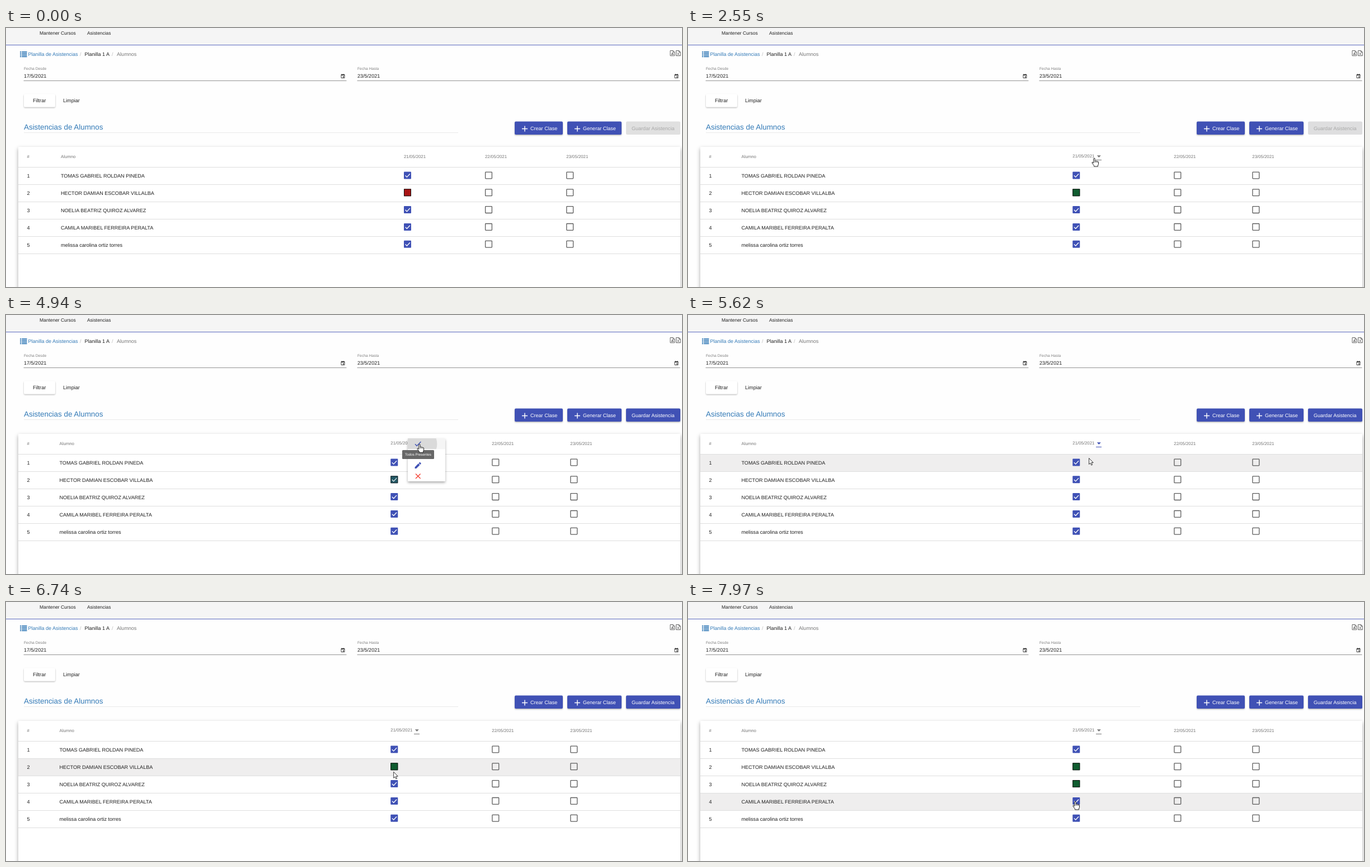
An HTML page for the animation above (8 s loop, 1208 by 464 pixels).

```html
<!DOCTYPE html>
<html lang="es">
<head>
<meta charset="utf-8">
<title>Planilla de Asistencias</title>
<style>
html, body { margin: 0; width: 1208px; height: 464px; overflow: hidden; background: #fefefe; }
svg { display: block; font-family: "Liberation Sans", Arial, sans-serif; text-rendering: geometricPrecision; }
</style>
</head>
<body>
<svg id="stage" width="1208" height="464" viewBox="0 0 1208 464"></svg>
<script>
const LOOP = 8000;
const BLUE = '#3f51b5', LINK = '#337ab7', INK = '#212121', GREY = '#757575';
const RED = [169, 20, 20], GREEN = [15, 92, 47], INDIGO = [63, 81, 181];
const names = [
  'TOMAS GABRIEL ROLDAN PINEDA',
  'HECTOR DAMIAN ESCOBAR VILLALBA',
  'NOELIA BEATRIZ QUIROZ ALVAREZ',
  'CAMILA MARIBEL FERREIRA PERALTA',
  'melissa carolina ortiz torres'
];
const dates = ['21/05/2021', '22/05/2021', '23/05/2021'];
const rowTop = i => 250 + 31 * i;
const boxMid = i => 264 + 30.8 * i;

// --- markup helpers
const text = (x, y, s, size = 9.05, fill = INK, extra = '') =>
  `<text x="${x}" y="${y}" font-size="${size}" fill="${fill}" ${extra}>${s}</text>`;
const rect = (x, y, w, h, fill, extra = '') =>
  `<rect x="${x}" y="${y}" width="${w}" height="${h}" fill="${fill}" ${extra}/>`;
const line = (d, color, w = 1, extra = '') =>
  `<path d="${d}" fill="none" stroke="${color}" stroke-width="${w}" ${extra}/>`;
const group = (id, body, extra = '') => `<g id="${id}" ${extra}>${body}</g>`;
const shadow = (id, dy, blur, alpha) =>
  `<filter id="${id}" x="-20%" y="-40%" width="140%" height="190%">
   <feDropShadow dx="0" dy="${dy}" stdDeviation="${blur}" flood-opacity="${alpha}"/></filter>`;

const field = (x, label, value) =>
  text(x, 75, label, 6.75, '#808080') + text(x, 89, value) +
  rect(x - .5, 94, 577, 1, '#949494') +
  line(`M${x + 567},83.5h6v6h-6zM${x + 567},84.5h6M${x + 568.5},82v2M${x + 571.5},82v2`, '#444') +
  rect(x + 570, 86.5, 2, 2, '#444');

const sheet = (x, glyph) =>
  line(`M${x},40.5h5l2.8,2.8v6.4h-7.8zM${x + 5},40.5v2.8h2.8`, '#555', .9) +
  line(`M${x + 2},${glyph}`, '#555', .9);

const plusButton = (x, w, label) =>
  rect(x, 167.5, w, 23.5, BLUE, 'rx="2" filter="url(#low)"') +
  line(`M${x + 13},180.5h10M${x + 18},175.5v10`, '#fff', 1.4) +
  text(x + 28, 182.5, label, 9.05, '#fff');

const listIcon = [0, 1, 2, 3].map(i =>
  rect(25, 42 + i * 2.8, 2.2, 1.8, LINK) + rect(28.2, 42 + i * 2.8, 9.3, 1.8, LINK)).join('');

const emptyBox = y => rect(.6, y - 5.9, 11.8, 11.8, 'none', 'rx=".8" stroke="#5c5c5c" stroke-width="1.3"');

const markBox = i => {
  const y = boxMid(i);
  return rect(0, y - 6.5, 13, 13, BLUE, `rx="1" id="fill${i}"`) +
    rect(.5, y - 6, 12, 12, 'none', `id="edge${i}" stroke="#111" stroke-width="1"`) +
    line(`M2.6,${y + .2}l2.8,2.9l5.4,-5.8`, '#fff', 1.3, `id="tick${i}"`);
};

const each = f => names.map((n, i) => f(i, n)).join('');

const menu =
  rect(718, 221, 67, 77, '#fff', 'rx="1.5" filter="url(#mid)"') +
  rect(718, 221, 67, 19.3, '#f5f5f5') +
  '<circle id="ripple" cx="738" cy="231" fill="#000" fill-opacity=".11" clip-path="url(#item)"/>' +
  line('M731,231.3l3.2,3.2l7.2,-7.4', BLUE, 1.4) +
  `<path d="M730.6,275v-2.6l6.3,-6.3l2.6,2.6l-6.3,6.3zM737.6,265.4l1.3,-1.3q.6,-.5 1.2,0l1.4,1.4q.5,.6 0,1.2l-1.3,1.3z" fill="${BLUE}"/>` +
  line('M732,284.5l8.6,8.6M740.6,284.5l-8.6,8.6', '#f44336', 1.4);

document.getElementById('stage').innerHTML =
  '<defs>' + shadow('low', 1.3, 1, .3) + shadow('mid', 2.5, 2.2, .32) +
  `<filter id="card" filterUnits="userSpaceOnUse" x="0" y="190" width="1208" height="330">
   <feDropShadow dx="0" dy="3" stdDeviation="3.6" flood-opacity=".34"/></filter>
   <clipPath id="item"><rect x="718" y="221" width="67" height="19.3"/></clipPath></defs>` +
  rect(0, 0, 1208, 464, '#fefefe') +
  rect(0, 0, 1208, 30, '#f5f5f5') + rect(0, 30, 1208, 1, BLUE, 'opacity=".85"') +
  text(60, 12.3, 'Mantener Cursos', 8.45) + text(145, 12.3, 'Asistencias', 8.4) +
  listIcon + text(39.5, 50.3, 'Planilla de Asistencias', 9, LINK) +
  text(132, 50.3, '/', 9, '#bbb') + text(140.5, 50.3, 'Planilla 1 A', 9) +
  text(189, 50.3, '/', 9, '#bbb') + text(198, 50.3, 'Alumnos', 9.1, '#777') +
  sheet(1187, '48l2,-4l.6,2.2l1.6,1l-4,.6') + sheet(1197.5, '44.5l3.6,4m0,-4l-3.6,4') +
  field(32, 'Fecha Desde', '17/5/2021') + field(628, 'Fecha Hasta', '23/5/2021') +
  rect(32, 118.5, 56, 23, '#fff', 'rx="2" filter="url(#low)"') +
  text(48, 133.4, 'Filtrar', 9.1) + text(102, 133.4, 'Limpiar', 9.1) +
  text(32, 181.7, 'Asistencias de Alumnos', 13.4, LINK) + rect(32, 187, 776, 1, '#e9e9e9') +
  plusButton(909, 86, 'Crear Clase') + plusButton(1003, 97, 'Generar Clase') +
  rect(1108, 167.5, 97, 23.5, '#e0e0e0', 'rx="2"') +
  text(1118, 182.5, 'Guardar Asistencia', 9.05, '#a8a8a8') +
  group('save', rect(1108, 167.5, 97, 23.5, BLUE, 'rx="2" filter="url(#low)"') +
    text(1118, 182.5, 'Guardar Asistencia', 9.05, '#fff')) +
  rect(22, 213, 1183, 290, '#fff', 'filter="url(#card)"') +
  rect(22, 250, 1183, 30.5, '#efeeee', 'id="hover"') +
  [249, 280, 311, 342, 373, 404].map(y => rect(22, y, 1183, 1, '#dedede')).join('') +
  text(37.5, 233.3, '#', 7.8, GREY) +
  each(i => text(37.5, rowTop(i) + 18, i + 1)) +
  group('people', text(0, 233.3, 'Alumno', 7.8, GREY) + each((i, n) => text(0, rowTop(i) + 18, n))) +
  group('day0', text(0, 233.3, dates[0], 7.8, GREY, 'id="date0"') + each(markBox)) +
  [1, 2].map(d => group('day' + d, text(0, 233.3, dates[d], 7.8, GREY) + each(i => emptyBox(boxMid(i))))).join('') +
  group('drop', '<path d="M730.8,228.3h7l-3.5,3.6z" fill="currentColor"/>' + rect(729, 236, 10, 1, 'currentColor')) +
  group('menu', menu) +
  group('tip', rect(708, 242, 57, 16, '#616161', 'rx="1.5" opacity=".96"') + text(713, 252.2, 'Todos Presentes', 6.3, '#fff')) +
  '<circle id="press" r="7" fill="#e2d428" fill-opacity=".62"/>' +
  group('arrow', '<path d="M0,0V11L2.5,8.7L4.2,12.6L6,11.8L4.3,8H7.6Z" fill="#fff" stroke="#222" stroke-width=".9"/>') +
  group('hand', '<path d="M-1.2,1Q0,-.8 1.2,1V5.2q1.3,-.9 2.2,.4q1.4,-.7 2.2,.6q1.5,-.5 1.9,.8V10Q7.5,12 6.5,13V15H-.5V13.5L-3.8,9Q-4.5,7.5 -3,7.3L-1.2,9Z" fill="#fff" stroke="#222"/>' +
    line('M1.2,5v3M3.4,5.6v2.4M5.6,6.2v2', '#222', .8));

const el = {};
document.querySelectorAll('[id]').forEach(n => el[n.id] = n);

// --- motion
const path = [
  [1380, 768, 275], [1800, 743.5, 252], [2140, 726, 233], [2890, 726, 233],
  [3310, 733.5, 227], [4300, 733.5, 227], [4440, 738, 230.5], [4590, 739, 231.3],
  [5480, 739, 231.3], [5820, 685, 292], [6250, 692, 296.5], [6640, 692, 296.5],
  [7030, 694.7, 326.5], [7550, 694.7, 326.5], [7970, 692, 357]
];
const presses = [[2410, 2550], [3710, 3790], [4790, 4870], [6320, 6460], [7290, 7430]];

const ramp = (t, a, b) => Math.min(1, Math.max(0, (t - a) / (b - a)));
const mix = (a, b, p) => a.map((v, i) => Math.round(v + (b[i] - v) * p));
const show = (node, on) => node.setAttribute('visibility', on ? 'visible' : 'hidden');
const move = (node, x, y = 0) => node.setAttribute('transform', `translate(${x} ${y})`);
const fade = (node, v) => node.setAttribute('opacity', v);

function pointer(t) {
  const k = path.findIndex(p => p[0] > t);
  if (k < 0) return path[path.length - 1].slice(1);
  if (k === 0) return path[0].slice(1);
  const [a, b] = [path[k - 1], path[k]], p = ramp(t, a[0], b[0]);
  return [a[1] + (b[1] - a[1]) * p, a[2] + (b[2] - a[2]) * p];
}

// p runs from the flat coloured square (0) to the ticked box (1)
function paint(i, flat, p) {
  el['fill' + i].setAttribute('fill', `rgb(${mix(flat, INDIGO, p)})`);
  fade(el['edge' + i], p < 1 ? 1 - p * .5 : 0);
  fade(el['tick' + i], Math.min(1, p * 2.2));
}

function draw(t) {
  const editing = t >= 2550;
  move(el.people, editing ? 95.5 : 98);
  [[711, 687.3], [856, 868.3], [1001.2, 1008.3]].forEach((x, d) => move(el['day' + d], x[+editing]));
  el.date0.setAttribute('y', editing ? 232.3 : 233.3);
  show(el.drop, editing);
  el.drop.setAttribute('color', t >= 3710 && t < 6320 ? BLUE : GREY);
  fade(el.save, ramp(t, 2550, 2800));

  const ticked = editing ? (t < 6440 ? ramp(t, 4860, 5060) : 0) : 0;
  names.forEach((n, i) => paint(i, GREEN, 1));
  paint(1, editing ? GREEN : RED, ticked);
  if (t >= 7430) paint(2, GREEN, 0);

  const open = ramp(t, 3760, 3880), shut = ramp(t, 5060, 5200);
  const s = .8 + .2 * open;
  el.menu.setAttribute('transform', `translate(718 221) scale(${s}) translate(-718 -221)`);
  fade(el.menu, open * (1 - shut));
  fade(el.tip, ramp(t, 3880, 3980) * (1 - ramp(t, 5120, 5270)));
  el.ripple.setAttribute('r', 55 * ramp(t, 4800, 5040));

  const [x, y] = pointer(t), on = t >= 1380;
  const row = Math.floor((y - 249.5) / 31);
  show(el.hover, on && row >= 0);
  el.hover.setAttribute('y', rowTop(Math.max(0, row)));
  const overBox = row >= 0 && Math.abs(x - 694) < 7 && Math.abs(y - boxMid(row)) < 7;
  const hand = y < 238 || overBox;
  show(el.hand, on && hand);
  show(el.arrow, on && !hand);
  move(el.hand, x, y);
  move(el.arrow, x, y);
  show(el.press, presses.some(p => t >= p[0] && t < p[1]));
  move(el.press, x, y);
}

const start = performance.now();
function tick(now) {
  draw(Math.max(0, now - start) % LOOP);
  requestAnimationFrame(tick);
}
draw(0);
requestAnimationFrame(tick);
</script>
</body>
</html>
```
